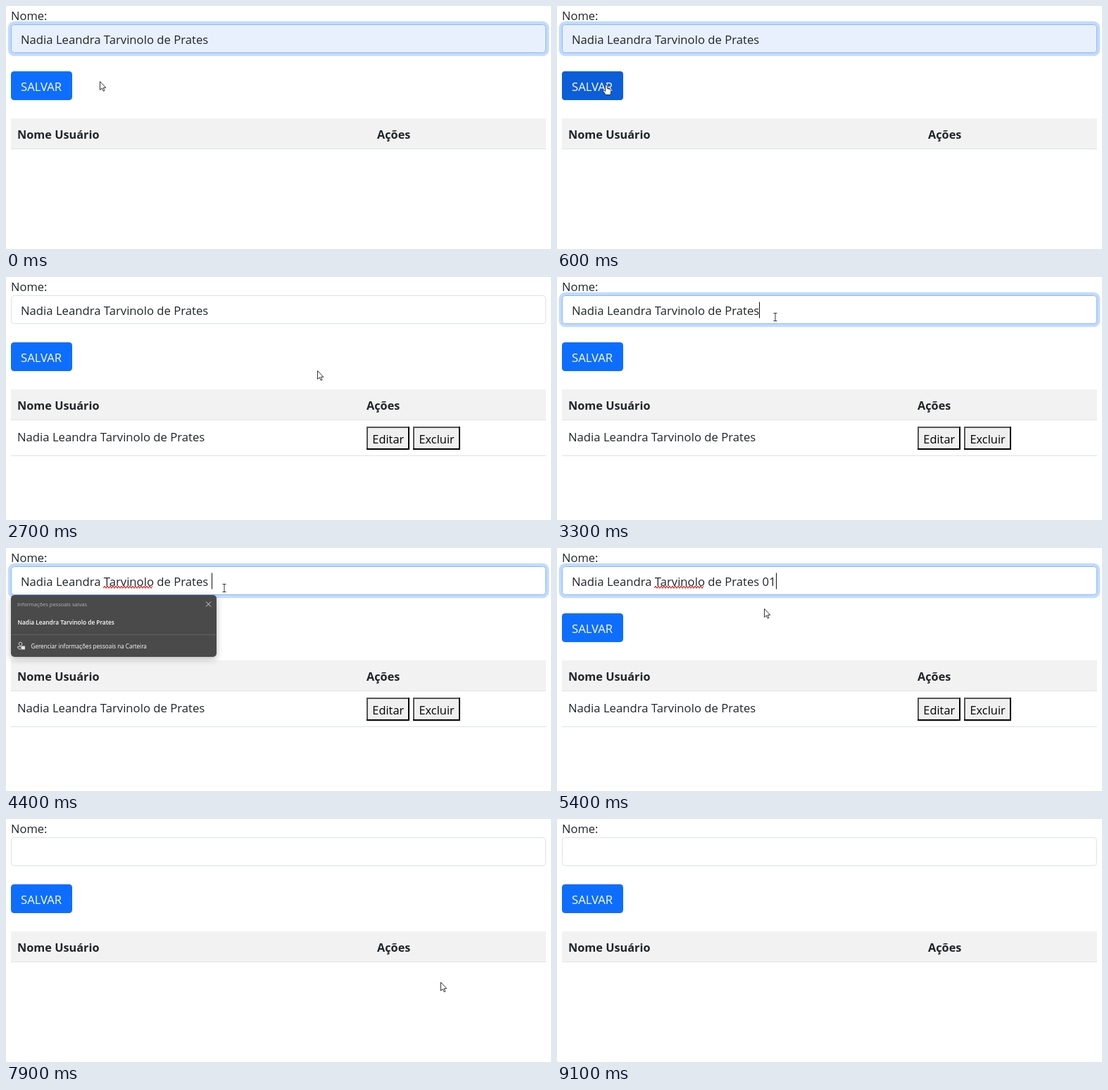
An HTML page that plays this animation: 774x346 px, repeating every 9.8 s.

```html
<!DOCTYPE html>
<html lang="pt-BR">
<head>
<meta charset="utf-8">
<title>Cadastro</title>
<style>
  html, body { margin: 0; width: 100%; height: 100%; overflow: hidden; background: #fff; }
  svg { display: block; }
  text { font: 16.7px "Open Sans", sans-serif; fill: #212529; white-space: pre; }
  .bold { font-size: 16.3px; font-weight: 700; }
  .line { fill: none; stroke: #dee2e6; }
  .ring { fill: none; stroke-width: 4.3; }
  #buttons rect { fill: #efefef; }
  #buttons path { fill: none; stroke: #000; stroke-width: 2; }
  #buttons .lit { stroke: #555; }
  #buttons text { font-size: 16.4px; fill: #000; }
  #popup { filter: drop-shadow(0 3px 5px rgba(0, 0, 0, .28)); }
  #popup text { font-size: 8.1px; fill: #fff; }
  #popup .hint { font-size: 7.5px; fill: #b4b4b4; }
  #popup .saved { font-size: 8.3px; font-weight: 600; }
  .icon { fill: none; stroke: #e6e6e6; stroke-width: .9; }
  #arrow, #hand { fill: #fff; stroke: #333; stroke-linejoin: round; }
  #beam { fill: none; stroke: #333; }
</style>
</head>
<body>
<svg width="774" height="346" viewBox="0 0 774 346">
  <text x="7" y="20" style="font-size:16.5px">Nome:</text>
  <rect id="fieldRing" class="ring" x="4.9" y="23.9" width="764.2" height="45.2" rx="7" stroke="#c2dbfe"/>
  <rect id="field" x="7.5" y="26.5" width="759" height="40" rx="4"/>
  <text id="value" x="21" y="53.5"></text>
  <path id="squiggle" fill="none" stroke="#e02020" stroke-width="1.1"/>
  <path id="caret" d="M.5 35.5V58.5" stroke="#111"/>

  <rect id="saveRing" class="ring" x="4.9" y="90.9" width="91.2" height="45.2" rx="7" stroke="#98c1fe"/>
  <rect x="7" y="93" width="87" height="41" rx="4.5" fill="#0d6efd"/>
  <rect id="saveDark" x="7" y="93" width="87" height="41" rx="4.5" fill="#0b5ed7"/>
  <text x="21" y="120.5" style="fill:#fff">SALVAR</text>

  <rect x="7" y="160" width="760" height="43" fill="#f2f2f2"/>
  <path class="line" d="M7 203.5H767"/>
  <text class="bold" x="16" y="189">Nome Usuário</text>
  <text id="actions" class="bold" y="189">Ações</text>

  <g id="row">
    <text id="user" x="16" y="233.5"></text>
    <path class="line" d="M7 254.5H767"/>
    <g id="buttons">
      <rect width="61" height="33"/>
      <path class="lit" d="M1 33V1H61"/>
      <path d="M0 32H60V0"/>
      <text x="8.3" y="24">Editar</text>
      <rect x="66" width="67" height="33"/>
      <path class="lit" d="M67 33V1H133"/>
      <path d="M66 32H132V0"/>
      <text x="74.5" y="24">Excluir</text>
    </g>
  </g>

  <g id="popup">
    <rect x="7" y="67" width="292" height="88" rx="5" fill="#4a4a4a"/>
    <text class="hint" x="16" y="83">Informações pessoais salvas</text>
    <path class="icon" d="M284 76.5l7 7m0-7l-7 7"/>
    <text id="saved" class="saved" x="16.5" y="109"></text>
    <path d="M7 123.5H299" stroke="#606060"/>
    <g class="icon">
      <circle cx="20.5" cy="136.5" r="2.3"/>
      <path d="M21 144h-1.5q-3-.3-3-3.5h5"/>
      <rect x="22" y="140" width="4.5" height="4" fill="#e6e6e6"/>
    </g>
    <text x="35.5" y="142.5">Gerenciar informações pessoais na Carteira</text>
  </g>

  <g id="cursor">
    <path id="arrow" d="M.5 .5V12.5L3.3 10 5.2 14.2 7 13.4 5.1 9.4H8.8Z"/>
    <path id="hand" d="M-1.3 1.5a1.3 1.3 0 0 1 2.6 0V5.5L5.6 6.5q1.5 .4 1.3 2L6 14.5H-.5L-4.5 9.3q-.6-1.6 1-1.4L-1.3 9.3Z"/>
    <path id="beam" d="M-2.5-5.5H2.5M0-5.5V5.5M-2.5 5.5H2.5"/>
  </g>
</svg>
<script>
const LOOP = 9800, STEP = 100, BLINK = 1000, KEY = 200;
const NAME = 'Nadia Leandra Tarvinolo de Prates', SUFFIX = ' 01';
// Moments of the session, in ms
const SAVE = 700, EDIT = 2200, FOCUS = 3200, SUGGEST = 3800, TYPE = 4300, RESAVE = 6100, REMOVE = 7900;

// Where the pointer goes, and when it arrives and leaves
const saveBtn = { x: 70, y: 112 };
const stops = [
  { x: 133, y: 107, at: 0 },
  { ...saveBtn, at: 600, until: 1000 },
  { x: 471, y: 186, at: 1400 },
  { x: 548, y: 231, at: 1900, until: EDIT },
  { x: 442, y: 133, at: 2700 },
  { x: 310, y: 57, at: FOCUS, until: 5100 },
  { x: 294, y: 86, at: 5400 },
  { ...saveBtn, at: 5900, until: 6600 },
  { x: 363, y: 158, at: 6900 },
  { x: 617, y: 232, at: 7500, until: 8300 },
  { x: 430, y: -40, at: 9100 }
];

const $ = id => document.getElementById(id);
const clamp = (v, lo = 0, hi = 1) => Math.min(hi, Math.max(lo, v));
const within = (t, a, b) => t >= a && t < b;
const fade = (t, a, b) => Math.min(clamp((t - a + 50) / 150), clamp((b + 100 - t) / 150));
const alpha = (id, v) => { $(id).style.opacity = +v; };
const attr = (id, name, v) => $(id).setAttribute(name, v);
const write = (id, s) => { if ($(id).textContent !== s) $(id).textContent = s; };

function pointer(t) {
  const i = stops.findIndex(s => s.at > t);
  if (i < 0) return stops[stops.length - 1];
  const a = stops[i - 1], b = stops[i], leave = a.until || a.at;
  const k = clamp((t - leave) / (b.at - leave));
  return { x: a.x + (b.x - a.x) * k, y: a.y + (b.y - a.y) * k };
}

function typed(t) {
  if (!within(t, 0, SAVE) && !within(t, EDIT, RESAVE)) return '';
  const keys = clamp(Math.floor((t - TYPE) / KEY) + 1, 0, SUFFIX.length);
  return NAME + SUFFIX.slice(0, keys);
}

function drawForm(t) {
  const focus = Math.max(fade(t, -STEP, SAVE), fade(t, FOCUS, RESAVE));
  const pressed = Math.max(fade(t, SAVE, EDIT - STEP), fade(t, RESAVE, 7600));
  const editing = within(t, FOCUS + STEP, RESAVE);
  alpha('fieldRing', focus);
  attr('field', 'stroke', focus > .5 ? '#86b7fe' : '#dee2e6');
  attr('field', 'fill', t < SAVE ? '#e8f0fe' : '#fff');
  write('value', typed(t));
  alpha('squiggle', within(t, TYPE - STEP, RESAVE));
  alpha('caret', editing && (t - TYPE + LOOP * 10) % BLINK < BLINK / 2);
  attr('caret', 'transform', `translate(${Math.round(21 + $('value').getComputedTextLength())})`);
  alpha('saveRing', pressed);
  alpha('popup', fade(t, SUGGEST, TYPE + KEY));
  return pressed;
}

function drawTable(t) {
  const filled = within(t, SAVE + STEP, REMOVE), renamed = t > RESAVE;
  const x = !filled ? 527 : renamed ? 525.5 : 512;
  alpha('row', filled);
  attr('actions', 'x', x);
  attr('buttons', 'transform', `translate(${x} 213)`);
  write('user', renamed ? NAME + SUFFIX : NAME);
}

function drawPointer(t) {
  const { x, y } = pointer(t);
  const onSave = x < 94 && within(y, 93, 134);
  const onRow = within(t, SAVE, REMOVE) && x > 512 && y > 213;
  const onField = within(y, 26, 67) && t < REMOVE;
  const kind = onSave || onRow ? 'hand' : onField ? 'beam' : 'arrow';
  for (const id of ['arrow', 'hand', 'beam']) alpha(id, id === kind);
  attr('cursor', 'transform', `translate(${x} ${y})`);
  return onSave;
}

let wave = 'M138 57';
for (let x = 140; x <= 209; x += 2) wave += `L${x} ${x % 4 ? 57 : 54.5}`;
attr('squiggle', 'd', wave);
write('saved', NAME);

const start = performance.now();
function frame() {
  const t = Math.floor((performance.now() - start) % LOOP / STEP) * STEP;
  const pressed = drawForm(t);
  drawTable(t);
  alpha('saveDark', drawPointer(t) ? 1 : pressed);
  requestAnimationFrame(frame);
}
frame();
</script>
</body>
</html>
```
